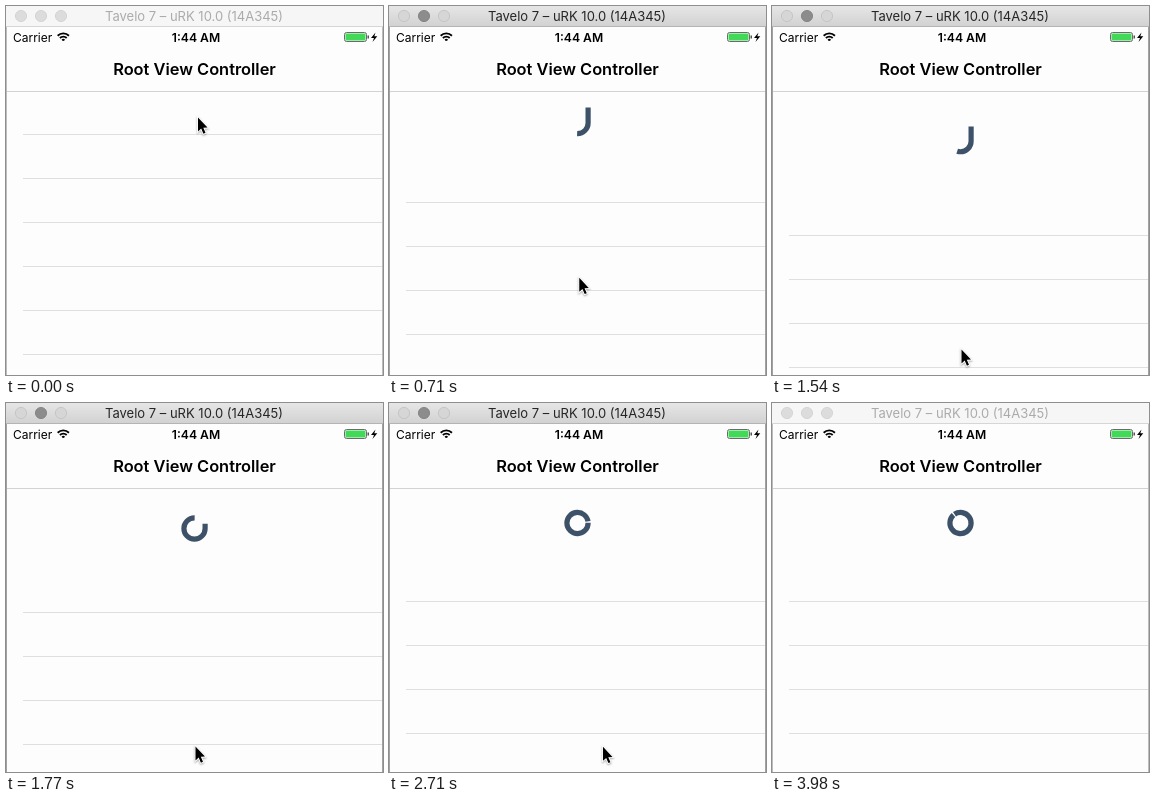
These frames come from a looping animation (377x369 px, 4.03 s). An HTML page with a canvas:

```html
<!DOCTYPE html>
<html>
<head>
<meta charset="utf-8">
<style>
  html, body { margin: 0; width: 100%; height: 100%; overflow: hidden; background: #fdfdfd; }
  canvas { display: block; }
</style>
</head>
<body>
<canvas id="stage" width="377" height="369"></canvas>
<script>
const W = 377, H = 369, LOOP = 4030;
const FIRST_STEP = 240, STEP = 117.4;
const RELEASE = 12, SPIN = 15, LEAVE = 20, GONE = 24, DEACTIVATE = 31;
const PULLED = 101, RESTING = 70, ROW = 44, NAV_BOTTOM = 86;
const ctx = document.getElementById('stage').getContext('2d');

const rad = deg => deg * Math.PI / 180;
const unit = x => Math.min(1, Math.max(0, x));
const easeOut = (x, power) => 1 - (1 - unit(x)) ** power;

// The list follows the drag, then springs back to its refreshing position.
function listOffset(k) {
  if (k < RELEASE) return Math.round(PULLED * easeOut(k / 9.5, 2.05));
  return Math.round(RESTING + (PULLED - RESTING) * 0.35 ** (k - RELEASE));
}

function pointer(k) {
  const drag = easeOut(k / 11, 2.6);
  const settle = unit((k - 13) / 3);
  const leave = unit((k - LEAVE) / 3);
  return {
    x: 191.5 - 2.5 * drag + settle + 122 * leave ** 1.5,
    y: 111 + 232 * drag - 7 * settle + 22 * leave
  };
}

function rect(x, y, w, h, color) {
  ctx.fillStyle = color;
  ctx.fillRect(x, y, w, h);
}

function text(str, x, y, size, weight, color, align = 'center') {
  ctx.font = `${weight} ${size}px Inter, sans-serif`;
  ctx.fillStyle = color;
  ctx.textAlign = align;
  ctx.fillText(str, x, y);
}

function drawTitleBar(active) {
  const bar = ctx.createLinearGradient(0, 0, 0, 20);
  bar.addColorStop(0, active ? '#e6e6e6' : '#f6f6f6');
  bar.addColorStop(1, active ? '#d2d2d2' : '#f6f6f6');
  rect(0, 0, W, 20, bar);
  rect(0, 20, W, 1, active ? '#b4b4b4' : '#d6d6d6');
  for (let i = 0; i < 3; i++) {
    const dark = active && i === 1;
    ctx.beginPath();
    ctx.arc(15 + 20 * i, 10, 5.6, 0, 7);
    ctx.fillStyle = dark ? '#8c8c8c' : active ? '#d6d6d6' : '#dcdcdc';
    ctx.strokeStyle = dark ? '#7c7c7c' : active ? '#c0c0c0' : '#d0d0d0';
    ctx.lineWidth = 0.8;
    ctx.fill();
    ctx.stroke();
  }
  text('Tavelo 7 – uRK 10.0 (14A345)', 188, 15, 13, 400, active ? '#262626' : '#ababab');
}

function drawWifi() {
  ctx.strokeStyle = '#000';
  ctx.lineWidth = 1.8;
  for (let r = 1.6; r < 9; r += 3.2) {
    ctx.beginPath();
    ctx.arc(57.3, 35.4, r, rad(-135), rad(-45));
    ctx.stroke();
  }
}

function drawBattery() {
  rect(339.5, 27.5, 20, 7, '#43d958');
  ctx.strokeStyle = '#6a6a6a';
  ctx.lineWidth = 1;
  ctx.beginPath();
  ctx.roundRect(338.5, 26.5, 22, 9, 2);
  ctx.stroke();
  rect(361.5, 29.5, 1.5, 3, '#555');
  ctx.fillStyle = '#000';
  ctx.fill(new Path2D('M369.5 26.5L365 32h3l-1.5 4 4.8-5.8h-3z'));
}

// A hook that curls into a ring on release, then spins.
function drawLoader(k, offset) {
  const x = 188.5, r = 10.6;
  const y = k > RELEASE ? 85 + offset / 2 : 79.6 + 0.55 * offset;
  ctx.save();
  ctx.beginPath();
  ctx.rect(0, NAV_BOTTOM, W, offset);
  ctx.clip();
  ctx.strokeStyle = '#3d5269';
  ctx.lineWidth = 5.2;
  ctx.beginPath();
  if (k < SPIN) {
    const curl = unit((k - 10.8) / 3.2);
    ctx.moveTo(x + r, y - 15.5 * (1 - curl));
    ctx.lineTo(x + r, y);
    ctx.arc(x, y, r, 0, rad(92 + 260 * curl));
  } else {
    const gap = 87 * (k - SPIN) - 167;
    ctx.arc(x, y, r, rad(gap + 3.5), rad(gap + 356.5));
  }
  ctx.stroke();
  ctx.restore();
}

function drawCursor({ x, y }) {
  const arrow = new Path2D('M.5 .5v14l3.2-2.9 2.2 5.1 2.1-.9-2.2-5 4.2-.2z');
  ctx.save();
  ctx.translate(x, y);
  ctx.shadowColor = 'rgba(0,0,0,.35)';
  ctx.shadowBlur = 2;
  ctx.shadowOffsetY = 1;
  ctx.strokeStyle = '#fff';
  ctx.lineWidth = 1.8;
  ctx.stroke(arrow);
  ctx.shadowColor = 'transparent';
  ctx.fillStyle = '#000';
  ctx.fill(arrow);
  ctx.restore();
}

function draw(time) {
  const k = Math.floor((time - FIRST_STEP) / STEP + 0.15);
  const active = k >= 0 && k < DEACTIVATE;
  const offset = listOffset(k);

  rect(0, 0, W, H, '#fdfdfd');
  for (let y = 128 + offset; y < H; y += ROW) rect(17, y, 359, 1, '#dfdfdf');
  drawLoader(k, offset);

  rect(0, NAV_BOTTOM - 1, W, 1, '#d2d2d2');
  text('Carrier', 7, 35.5, 12, 400, '#000', 'left');
  text('1:44 AM', 190, 35.5, 12.2, 600, '#000');
  text('Root View Controller', 188.5, 69, 16.4, 600, '#000');
  drawWifi();
  drawBattery();

  const edge = active ? '#a2a2a2' : '#bcbcbc';
  rect(0, 20, 1, H, edge);
  rect(W - 1, 20, 1, H, edge);
  drawTitleBar(active);
  if (k < GONE) drawCursor(pointer(k));
}

function tick() {
  draw(performance.now() % LOOP);
  requestAnimationFrame(tick);
}
tick();
</script>
</body>
</html>
```
